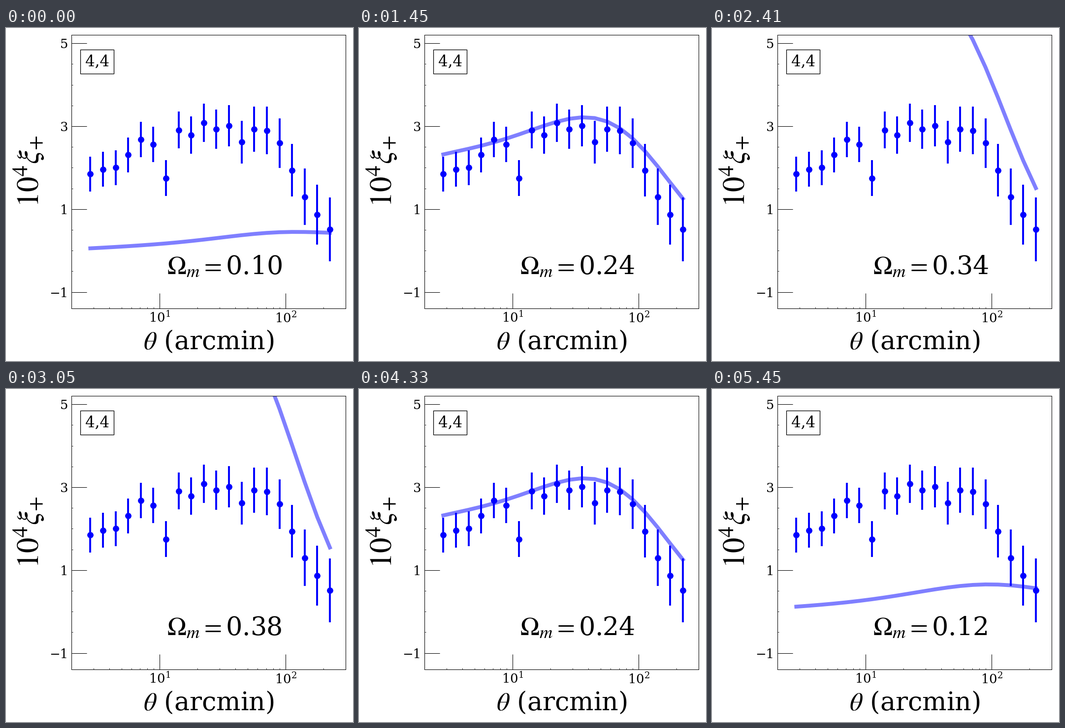
A matplotlib script for the animation above (5610 ms loop, 705 by 678 pixels).

```python
import numpy as np
import matplotlib.pyplot as plt
from matplotlib.animation import FuncAnimation
from matplotlib.patches import Rectangle
from matplotlib.ticker import MultipleLocator, NullFormatter

W, H, DPI = 705, 678, 72          # one point is one pixel
PT = 1.305                        # pixels per nominal point
LOOP, TICK = 5610, 30             # ms
HOLD, STEP, POSES = 330, 160, 34  # first pose is held longer
BINS = 20

plt.rcParams.update({
    "font.family": "DejaVu Serif",
    "mathtext.fontset": "stix",
    "axes.linewidth": 0.8 * PT,
})


def through(x, y, xs):
    """Polynomial through the points (x, y), evaluated at xs."""
    n = len(x)
    return np.vander(xs, n) @ np.linalg.solve(np.vander(x, n), y)


def omega(k):
    return 0.10 + 0.0173 * np.asarray(k)


bins = np.arange(BINS)
u = bins / (BINS - 1)
theta = 10 ** (0.4505 + 0.1 * bins)

# Observed points, with errors growing towards wide angles
xi = [1.85, 1.96, 2.00, 2.31, 2.68, 2.56, 1.75, 2.91, 2.79, 3.08,
      2.93, 3.01, 2.62, 2.93, 2.90, 2.595, 1.94, 1.30, 0.87, 0.515]
err = 0.42 + 0.35 * u ** 2.8

# Model: log xi is a polynomial in angle and in log density, set by key points
key_bins = np.array([0, 4, 8, 12, 16, 19])
key_poses = np.array([0, 3, 8, 12])
key_xi = [[0.055, 0.127, 0.232, 0.372, 0.451, 0.431],
          [0.392, 0.573, 0.864, 1.148, 1.121, 0.810],
          [2.321, 2.611, 3.014, 3.198, 2.398, 1.255],
          [5.135, 5.300, 5.430, 5.111, 3.305, 1.450]]
poses = np.arange(POSES // 2 + 1)
by_pose = through(np.log(omega(key_poses)), np.log(key_xi), np.log(omega(poses)))
curves = np.exp(through(u[key_bins], by_pose.T, u)).T

fig = plt.figure(figsize=(W / DPI, H / DPI), dpi=DPI, facecolor="white")
left, right, top, bottom = 133, 690.4, 14.4, 571.4
ax = fig.add_axes([left / W, 1 - bottom / H, (right - left) / W, (bottom - top) / H])
ax.set_xscale("log")
ax.set_xlim(2, 300)
ax.set_ylim(-1.4, 5.2)
ax.set_yticks([-1, 1, 3, 5])
ax.yaxis.set_minor_locator(MultipleLocator(0.5))
ax.xaxis.set_minor_formatter(NullFormatter())
ax.tick_params(which="major", direction="in", length=24 * PT, width=0.8 * PT,
               labelsize=25.8)
ax.tick_params(which="minor", direction="in", length=2.4 * PT, width=0.6 * PT)
ax.tick_params(axis="x", pad=5)
ax.tick_params(axis="y", pad=7)


def label(x, y, s, size, **kw):
    return fig.text(x / W, 1 - y / H, s, fontsize=size * PT, va="baseline", **kw)


label((left + right) / 2, 653.5, r"$\theta$ (arcmin)", 40, ha="center")
label(67, 292, r"$10^4\xi_{+}$", 48, ha="center", rotation=90, rotation_mode="anchor")
label(185.5, 77.5, "4,4", 23.7, ha="center")
value = label(327, 501, "", 40, ha="left")
fig.add_artist(Rectangle((151.2, H - 93.2), 68, 49, transform=None,
                         fill=False, ec="black", lw=PT))

curve, = ax.plot(theta, curves[0], color="blue", alpha=0.5, lw=6 * PT, zorder=2)
ax.errorbar(theta, xi, yerr=err, fmt="o", color="blue", ms=9 * PT,
            elinewidth=3 * PT, capsize=0, zorder=3)


def update(i):
    t = i * TICK + TICK - 1
    pose = 0 if t < HOLD else 1 + (t - HOLD) // STEP
    k = min(pose, POSES - pose)  # up, then back down
    curve.set_ydata(curves[k])
    value.set_text(rf"$\Omega_m=${omega(k):.2f}")
    return curve, value


anim = FuncAnimation(fig, update, frames=LOOP // TICK, interval=TICK,
                     repeat=True, repeat_delay=0, blit=False)
plt.show()
```
